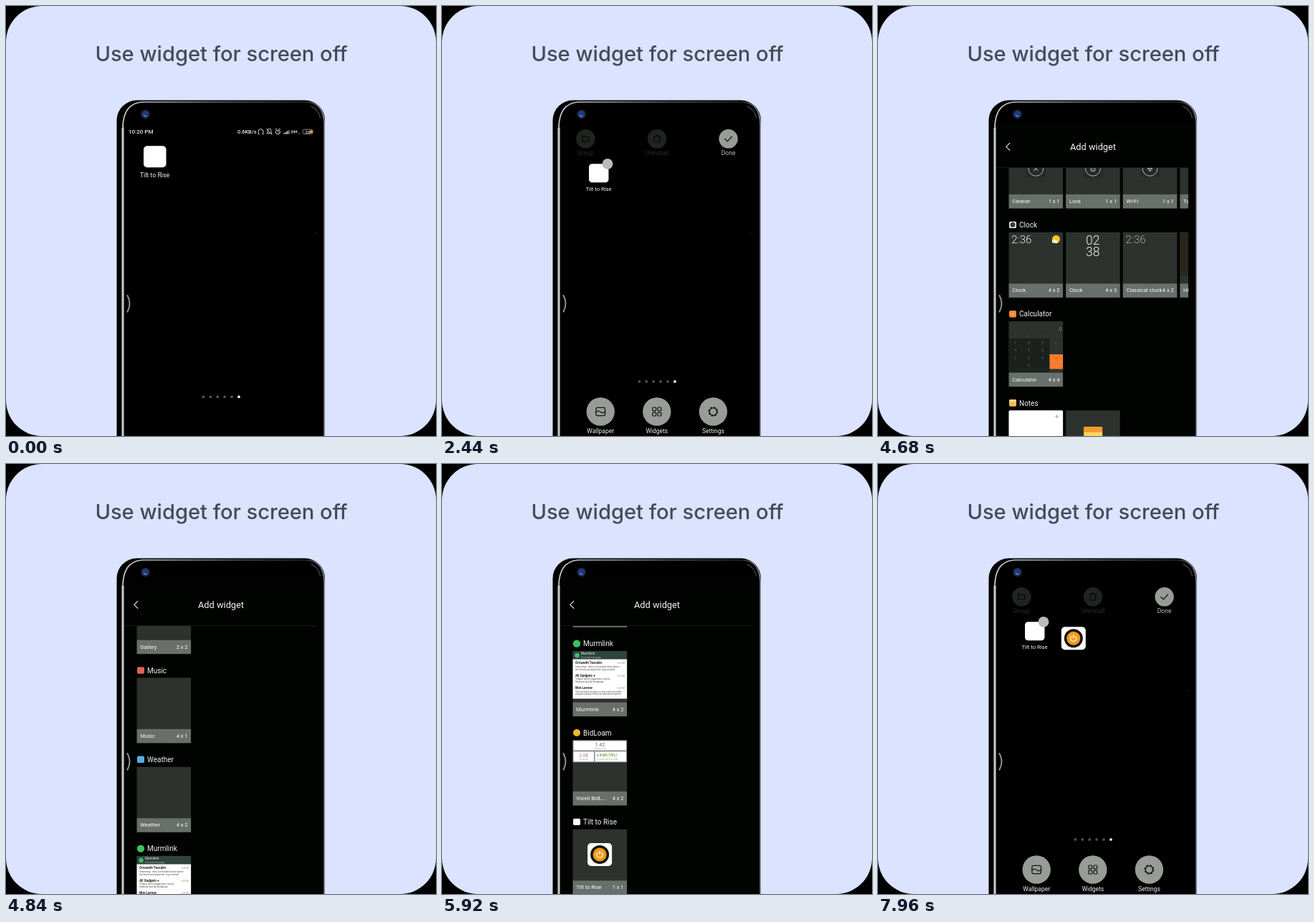
These frames come from a looping animation (600x600 px, 8000 ms). An HTML page:

```html
<!DOCTYPE html>
<html lang="en">
<head>
<meta charset="utf-8">
<title>Use widget for screen off</title>
<style>
  html, body { margin: 0; width: 100%; height: 100%; overflow: hidden; background: #000; }
  svg { display: block; width: 100vw; height: 100vh; font-family: Roboto, sans-serif; }
</style>
</head>
<body>
<svg id="stage" viewBox="0 0 600 600"></svg>
<script>
const LOOP = 8000;
const TICK = 40;          // the scroll moves in ticks, like a screen recording
const ROW = 124.35;       // distance between widget sections
const SCROLL_END = 856;
const CARD = "#2d322e", FOOTER = "#696f6a", BUTTON = "#979c97";

// Markup helpers
const attrs = o => Object.entries(o).map(([k, v]) => ` ${k}="${v}"`).join("");
const rect = (x, y, width, height, fill, rx = 0, more = {}) =>
  `<rect${attrs({ x, y, width, height, fill, rx, ...more })}/>`;
const circle = (cx, cy, r, fill, more = {}) => `<circle${attrs({ cx, cy, r, fill, ...more })}/>`;
const line = (d, stroke, width = 1, more = {}) =>
  `<path${attrs({ d, fill: "none", stroke, "stroke-width": width, "stroke-linecap": "round", "stroke-linejoin": "round", ...more })}/>`;
const text = (x, y, size, fill, str, more = {}) =>
  `<text${attrs({ x, y, "font-size": size, fill, ...more })}>${str}</text>`;
const group = (id, ...parts) => `<g id="${id}">${parts.join("")}</g>`;
const at = (x, y, ...parts) => `<g transform="translate(${x} ${y})">${parts.join("")}</g>`;
const MID = { "text-anchor": "middle" }, END = { "text-anchor": "end" };
const BOLD = { "font-weight": 700 }, THIN = { "font-weight": 300 };

const powerButton = (x, y) => at(x, y,
  rect(-17, -16, 34, 32, "#fff", 5),
  circle(0, 0, 13, "#15130f"),
  circle(0, 0, 9.5, "#f39a1d"),
  line("M-2.9 -2.8A4.1 4.1 0 1 0 2.9 -2.8M0 -4.8V-.5", "#fff", 1.3));

// Phone body
function phone() {
  return rect(154.5, 131.5, 290.5, 500, "#000", 28) +
    line("M163 600V170", "url(#side)", 3.4, { "stroke-linecap": "butt" }) +
    line("M163 171Q163 136 190 134H418Q443.8 134 444.2 166V600", "url(#edge)", 1.7) +
    line("M426 140Q436 144 438.5 156", "#3a3d42", 1.5) +
    circle(194.5, 151, 6.2, "#20263a") + circle(194.5, 151, 4.7, "#1f3a80") +
    line("M192.4 152.5Q193.5 154 195.5 153.8", "#a9c1f5", 1);
}

function statusBar() {
  const c = "#ddd", m = { "font-weight": 500 };
  return group("status",
    text(171, 178.3, 8, "#eee", "10:20 PM", m),
    text(323, 178.2, 7.4, "#eee", "0.6KB/s", m),
    line("M352.2 177.5V175a3.3 3.3 0 0 1 6.6 0V177.5M351.8 178.6h1.3M357.9 178.6h1.3", c, 1),
    line("M364.3 177.5h6.5l-1-2v-2a2.3 2.3 0 0 0-4.6 0v2zM363.3 171.5l8 8", c, .9),
    circle(379.3, 175.8, 3.1, "none", { stroke: c }),
    line("M379.3 174v2h1.4M376 172l1.5-1M382.6 172l-1.5-1", c, .9),
    [0, 1, 2, 3, 4].map(i => rect(387 + i * 1.9, 177.5 - i * 1.1, 1.3, 1.3 + i * 1.1, i > 3 ? "#777" : c)).join(""),
    text(398, 178.2, 7.2, "#eee", "H+", m), text(408, 179, 4, c, "x"),
    rect(413.8, 172.2, 14.5, 6.4, "none", 3, { stroke: "#aaa", "stroke-width": .8 }),
    text(417.5, 177.6, 6, "#ddd", "26", m), circle(425.8, 175.4, 2.2, "#d9a93a"));
}

function editControls() {
  const ink = "#111411";
  const bottom = (x, label, icon) =>
    at(x, 566, circle(0, 0, 19.7, BUTTON), icon, text(0, 30, 8.5, "#eee", label, MID));
  const top = (x, label, icon, fill, tone) =>
    at(x, 185.3, circle(0, 0, 13.2, fill), icon, text(0, 22.5, 8.5, tone, label, MID));
  const squares = [[-6, -6], [1.2, -6], [-6, 1.2], [1.2, 1.2]]
    .map(([x, y]) => rect(x, y, 4.8, 4.8, "none", 1, { stroke: ink, "stroke-width": 1.2 })).join("");
  const teeth = circle(0, 0, 6, "none", { stroke: ink, "stroke-width": 1.8, "stroke-dasharray": "2.4 2.31" });
  return group("edit",
    group("editTop",
      top(200.3, "Group", line("M-4.5 -3.8h3.5l1.2 1.3h4.3v6h-9z", "#060806", 1.2), "#202420", "#292d29"),
      top(300, "Uninstall", line("M-4.8 -3.5H4.8M-1.5 -5h3M-3.7 -3.5V4.5H3.7V-3.5", "#060806", 1.2), "#202420", "#292d29"),
      top(399.6, "Done", line("M-4.8 .2L-1.4 3.6L4.8 -3", ink, 1.3), BUTTON, "#bbb")),
    group("editBottom",
      bottom(221.2, "Wallpaper",
        rect(-6.3, -5.7, 12.6, 11.4, "none", 1.8, { stroke: ink, "stroke-width": 1.3 }) +
        line("M-6 .8Q-3 -2.4 0 .4T6 .2", ink, 1.2)),
      bottom(299.8, "Widgets", squares),
      bottom(378.4, "Settings", circle(0, 0, 5.2, "none", { stroke: ink, "stroke-width": 1.3 }) + teeth)));
}

// Cards are drawn from their own top left corner
function card(column, name, size, preview = "") {
  return at(182.5 + column * 79.6, 246.5,
    rect(0, 0, 75.6, 71.8, CARD), preview, rect(0, 71.6, 75.6, 19.6, FOOTER),
    text(4.8, 83.8, 7.5, "#fff", name), text(71, 83.8, 7.5, "#fff", size, END));
}
const section = (index, title, icon, ...cards) =>
  at(0, index * ROW, at(188, 236.2, icon), text(197, 240, 10, "#f2f2f2", title), ...cards);
const badge = (fill, mark = "") => rect(-5, -4.7, 10, 9.4, fill, 1.8) + mark;

function quickIcon(mark) {
  return rect(25, 23, 26, 25, "#252a26") +
    at(37.8, 35.5, circle(0, 0, 10.4, "none", { stroke: "#c9cbc9", "stroke-width": .9 }), mark);
}

function calculator() {
  const rows = ["C«%÷", "789×", "456−", "123+", " 0 ="];
  const keys = rows.map((row, r) => [...row].map((key, c) =>
    text(9 + c * 19, 21.3 + r * 10.5, 5.5, r ? "#59605a" : "#444a45", key, MID)).join(""));
  return rect(0, 24, 57, 47.6, "#1c211e") + text(74, 12.5, 6.5, "#858a85", "0", END) +
    rect(57, 46, 18.6, 20.5, "#f97d2c") + keys.join("") + text(66.3, 63.5, 5, "#ffd3b0", "=", MID);
}

function chatPreview() {
  const chats = [
    ["Orvaneth Tessalin", "Interesting - does our handset client detect", "the theme and adjust the crop on that?"],
    ["All Gadgets ♥", "Today's lunch suggestions are [a]", "flatbread and [b] dumplings"],
    ["Nim Larrow", "The intended recipient or any of the intended", "recipient please notify the intended recipient"]
  ];
  return rect(0, 0, 75.6, 11.5, "#30443b") + circle(6, 6, 3.2, "#3fc05c") +
    text(11.5, 5.4, 4.6, "#e8eee9", "Murmlink") + text(11.5, 9.6, 3.2, "#b5bfb8", "2 unread messages") +
    rect(0, 11.5, 75.6, 55, "#fff") +
    chats.map(([name, a, b], i) => at(3.5, 18.5 + i * 17.3,
      text(0, 0, 4.6, "#222", name, BOLD), text(69, 0, 2.8, "#888", "4:43 PM", END),
      text(0, 4.5, 3.25, "#444", a), text(0, 8.3, 3.25, "#444", b),
      line("M0 10.6H69", "#e3e3e3", .3))).join("");
}

function earningsPreview() {
  return rect(0, 0, 75.6, 31, "#858985") + rect(1, 1.2, 73.6, 13, "#fff") +
    rect(1, 16, 28.5, 14, "#fff") + rect(31, 16, 43.6, 14, "#fff") +
    text(37.8, 8.6, 7, "#666", "1.42", MID) + text(37.8, 12.6, 3, "#aaa", "Today so far", MID) +
    text(15, 23.5, 6.5, "#888", "3.08", MID) + text(15, 28, 3, "#aaa", "Yesterday", MID) +
    text(33.5, 23, 5, "#5d9a35", "♦ 0.60 (15%)", BOLD) + text(33.5, 28, 3, "#9ab08a", "vs same day last week");
}

function playerPreview() {
  const c = "#333";
  return rect(0, .5, 75.6, 17, "#fff") + rect(0, .5, 18.6, 17, "url(#cover)") +
    text(22, 5.5, 3.6, "#444", "Lantern in Bloom") + text(22, 9.2, 3, "#aaa", "Dim Oak") +
    at(0, 13.2,
      line("M22.5 .5a2 2 0 1 0 2-2M24.5 -1.5l1-1", "#666", .7),
      line("M33.6 -1.7V1.7M38 -1.5L35 0L38 1.5z", c, 1),
      `<path d="M45 -2.8L50 0L45 2.8z" fill="${c}"/>`,
      line("M61 -1.7V1.7M56.5 -1.5L59.5 0L56.5 1.5z", c, 1),
      line("M67.5 -1.8h4v2.6h-2l-1 1.2z", "#666", .7));
}

function widgetList() {
  const white = "#d5d8d5";
  const sun = circle(66, 9.7, 5.5, "#f7c52b") + circle(62.8, 12.6, 2.5, "#fff3c8") + circle(66, 13.5, 2.2, "#fff3c8");
  const lock = rect(-3, -1.2, 6, 4.8, "none", 1.8, { stroke: white }) + line("M-1.8 -1.4V-2.7a1.8 1.8 0 0 1 3.6 0V-1.4M0 .7V1.6", white);
  const wifi = line("M-4.6 -1.5Q0 -5.3 4.6 -1.5M-3 .5Q0 -2 3 .5M-1.3 2.3Q0 1.3 1.3 2.3", white, 1.2) + circle(0, 3.5, .8, white);
  const notepad = rect(25, 23, 26, 34, "#fbd45f", 1) + rect(25, 23, 26, 7.5, "#f49a2c", 1);
  return group("list",
    section(0, "Quick functions", badge("#31a980", circle(2.2, 0, 1.5, "#fff")),
      card(0, "Cleaner", "1 x 1", quickIcon(line("M-3 -3L3 3M3 -3L-3 3", white))),
      card(1, "Lock", "1 x 1", quickIcon(lock)),
      card(2, "Wi-Fi", "1 x 1", quickIcon(wifi)),
      card(3, "Torch", "1 x 1", quickIcon(""))),
    section(1, "Clock", badge("#e9e9e9", circle(0, 0, 3.5, "#3a3d3b")),
      card(0, "Clock", "4 x 2", text(3.8, 15, 15, "#f2f2f2", "2:36", THIN) + sun),
      card(1, "Clock", "4 x 3", text(37.6, 17, 17.6, "#f2f2f2", "02", { ...MID, ...THIN }) +
        text(37.6, 33, 17.6, "#f2f2f2", "38", { ...MID, ...THIN })),
      card(2, "Classical clock", "4 x 2", text(3.8, 15, 15, "#a5aaa6", "2:36", THIN)),
      card(3, "History", "4 x 2", rect(0, 0, 75.6, 60, "#29261a"))),
    section(2, "Calculator", badge("#f58a35", text(0, 2.3, 6, "#fff", "=", MID)),
      card(0, "Calculator", "4 x 4", calculator())),
    section(3, "Notes", badge("#f3bd54", rect(-5, -4.7, 10, 3, "#f7d98f", 1)),
      card(0, "Notes", "2 x 2", rect(0, 0, 75.6, 71.6, "#fff", 2) + line("M64.5 8.5h5M67 6v5", "#888", .7)),
      card(1, "Notes", "1 x 1", notepad)),
    section(4, "Gallery", badge("#5b8fe0"), card(0, "Gallery", "2 x 2")),
    section(5, "Music", badge("#e0605b"), card(0, "Music", "4 x 1")),
    section(6, "Weather", badge("#58aee0"), card(0, "Weather", "4 x 2")),
    section(7, "Murmlink", circle(0, 0, 5.2, "#3fc05c"), card(0, "Murmlink", "4 x 2", chatPreview())),
    section(8, "BidLoam", circle(0, 0, 5, "#f5b72f"),
      group("statsEmpty", card(0, "", "4 x 2")),
      group("statsReady", card(0, "Vorell BidL...", "4 x 2", earningsPreview()))),
    section(9, "Tilt to Rise", badge("#fff"),
      group("tileOld", card(0, "Vorell Tune..", "1 x 1", playerPreview())),
      group("tileReady", card(0, "Tilt to Rise", "1 x 1", powerButton(37.6, 35.3))),
      group("press", rect(182.5, 246.5, 75.6, 91.2, "#fff", 0, { "fill-opacity": .22 }))));
}

function addPage() {
  return group("page",
    rect(165.5, 161, 276, 439, "#010301"),
    group("header", line("M183.8 193L178.8 198L183.8 203", "#eee", 1.1),
      text(300, 202.4, 12.8, "#f2f2f2", "Add widget", MID)),
    `<g clip-path="url(#listArea)">${widgetList()}</g>`,
    group("rule", rect(165.5, 225, 268, .8, "#1b1e1b")));
}

document.getElementById("stage").innerHTML = `<defs>
  <linearGradient id="side" gradientUnits="userSpaceOnUse" x1="161" y1="0" x2="165" y2="0">
    <stop stop-color="#85888d"/><stop offset=".5" stop-color="#d8dadd"/><stop offset="1" stop-color="#8f9297"/></linearGradient>
  <linearGradient id="edge" gradientUnits="userSpaceOnUse" x1="163" y1="0" x2="445" y2="0">
    <stop stop-color="#d0d2d5"/><stop offset=".15" stop-color="#b4b7bb"/><stop offset=".55" stop-color="#55585c"/>
    <stop offset=".9" stop-color="#222428"/><stop offset="1" stop-color="#8c9098"/></linearGradient>
  <linearGradient id="cover" x2="1" y2="1">
    <stop stop-color="#d9a14a"/><stop offset=".5" stop-color="#a8552f"/><stop offset="1" stop-color="#d8b48a"/></linearGradient>
  <clipPath id="listArea"><rect x="165" y="226" width="268" height="374"/></clipPath></defs>` +
  rect(0, 0, 600, 600, "#000") + rect(0, 0, 600, 600, "#dbe3ff", 50) +
  text(300.5, 77, 29.1, "#454a5a", "Use widget for screen off",
    { ...MID, "font-family": "Inter, sans-serif", "font-weight": 500 }) +
  phone() + statusBar() +
  group("workspace", rect(192, 195.3, 31.5, 30, "#fff", 5), text(207.5, 239, 8.85, "#f2f2f2", "Tilt to Rise", MID)) +
  group("dots", ...[0, 1, 2, 3, 4, 5].map(i => circle(275.4 + i * 9.9, 545.3, 1.9, i < 5 ? "#555" : "#fff"))) +
  rect(432, 315.5, 1, 1, "#555") + editControls() +
  group("marker", circle(231, 220.3, 7.4, "#b5bdb5")) +
  group("widget", powerButton(272.8, 243.2)) +
  addPage() + line("M169.5 404Q175.5 415 169.5 426.5", "#8f928f", 2);

// Each step is [time in ms, value, easing]
function track(id, prop, steps) {
  const all = [[0, steps[0][1]], ...steps, [LOOP, steps.at(-1)[1]]];
  document.getElementById(id).animate(
    all.map(([ms, value, easing = "linear"]) => ({ offset: ms / LOOP, [prop]: value, easing })),
    { duration: LOOP, iterations: Infinity });
}
const fade = (id, from, to, a, b) => track(id, "opacity", [[from, a, "ease-out"], [to, b]]);
const swap = (id, ms, a, b) => fade(id, ms, ms, a, b);
const shift = y => `translate(0px, ${y}px)`;
const slide = (id, from, to, a, b) => track(id, "transform", [[from, shift(a), "ease-out"], [to, shift(b)]]);

// Home screen to edit mode
fade("status", 2080, 2240, 1, 0);
fade("edit", 2080, 2400, 0, 1);
fade("marker", 2160, 2400, 0, 1);
slide("editTop", 2080, 2400, -12, 0);
slide("editBottom", 2080, 2400, 30, 0);
slide("dots", 2080, 2400, 0, -21.4);
track("workspace", "transform", [
  [2080, "translate(0px, 0px) scale(1)", "ease-out"],
  [2400, "translate(38px, 50.3px) scale(.87)"]]);

// Widget picker
track("page", "opacity", [[3440, 0, "ease-out"], [3640, 1], [6960, 1, "ease-out"], [7160, 0]]);
slide("header", 4560, 4680, 0, -1.6);
fade("rule", 4560, 4680, 0, 1);
const scroll = [[4560, 0], [4680, 55.2], [4760, 290], [4840, 570], [4920, 765], [5000, SCROLL_END]];
track("list", "transform", scroll.map(([ms, y], i) => {
  const next = scroll[i + 1];
  return [ms, shift(-y), next ? `steps(${(next[0] - ms) / TICK})` : "linear"];
}));
swap("statsEmpty", 5040, 1, 0);
swap("statsReady", 5040, 0, 1);
swap("tileOld", 5040, 1, 0);
swap("tileReady", 5040, 0, 1);
swap("press", 6760, 0, 1);

// Widget lands on the home screen
fade("widget", 7120, 7360, 0, 1);
</script>
</body>
</html>
```
